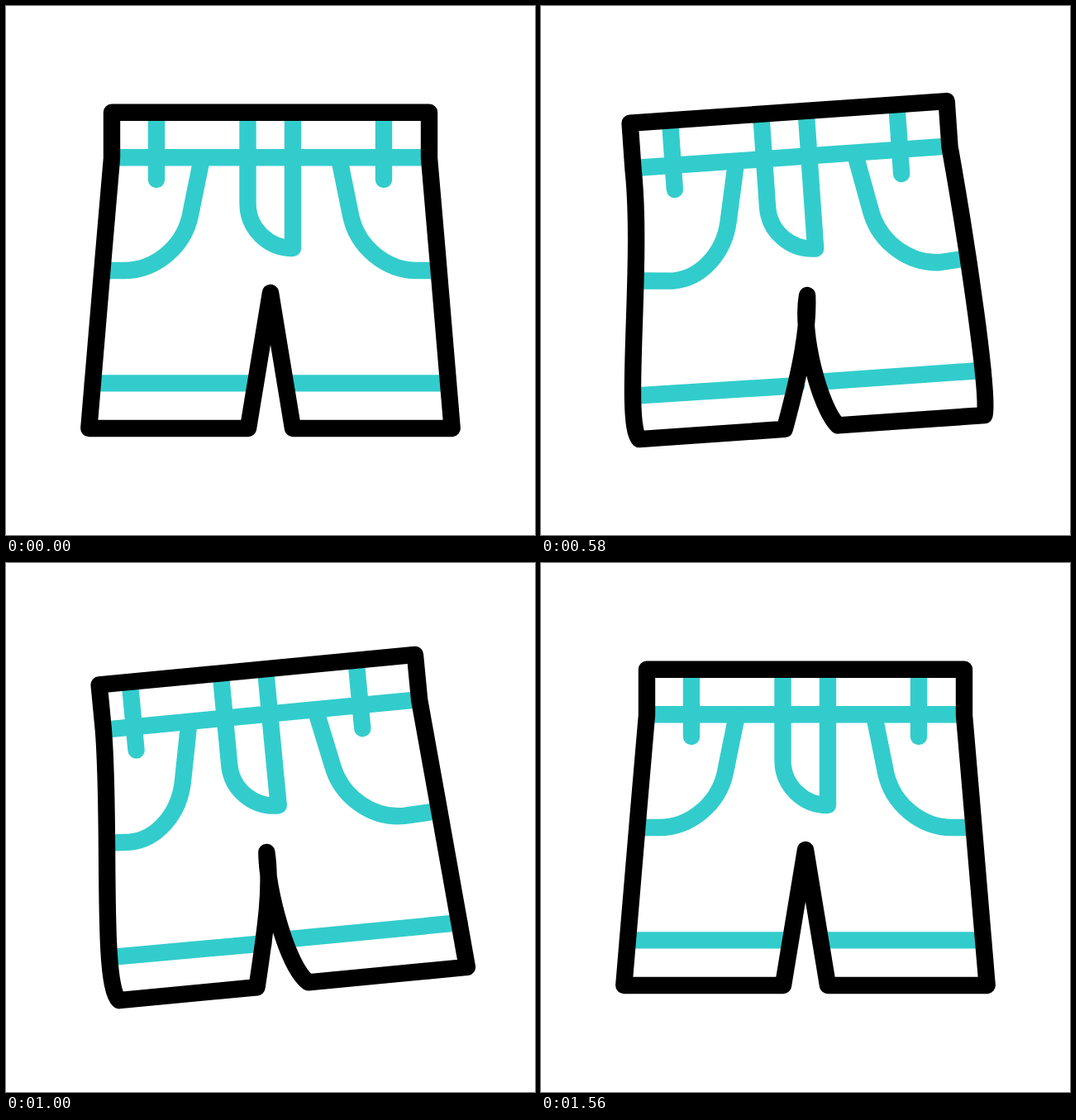
An HTML page that plays this animation: 640 px wide and 640 px high, repeating every 2400 ms.

```html
<!DOCTYPE html>
<html lang="en">
<head>
<meta charset="utf-8">
<title>Swinging shorts</title>
<style>
html, body { margin: 0; width: 100%; height: 100%; overflow: hidden; background: #fff; }
svg { display: block; width: 100vw; height: 100vh; }
path { fill: none; stroke-width: 20.4; stroke-linecap: round; stroke-linejoin: round; }
#trim path { stroke: #33cccc; }
#outline { stroke: #000; }
</style>
</head>
<body>
<svg viewBox="0 0 640 640">
  <g id="shorts">
    <g id="trim">
      <path id="band"/>
      <path id="details" d="M182 133V210M457 133V210M292.5 133V239A54.5 54 0 0 0 347 293V133"/>
      <path id="pockets"/>
      <path id="hem"/>
    </g>
    <path id="outline"/>
  </g>
</svg>
<script>
const LOOP = 2400, STEP = 20;
const el = id => document.getElementById(id);

// Damped swing: [time, degrees]
const swing = [[0, 0], [410, -20.2], [734, 10], [1007, -5.5], [1350, 3.8], [1560, 0]];

// Offsets of each part from its rest place, zero at both ends
const times = [0, 160, 420, 580, 734, 860, 1160, 1400];
const tracks = {
  body:   [-0.3, -1, -7.5, -4, -1, 4],
  lift:   [-1.4, -9.7, -1.3, -3, -0.7, 0],
  drop:   [0.7, 2.2, 2.7, 2, 2, 0.8],
  slide:  [-15.6, -42.6, -13, 8, -7, -19],
  pocket: [-16, -44.5, 8, 30, 17.5, -19],
  curve:  [-8, -18, 16, 32, 26, -12],
  hem:    [2.2, 7, 3, 2.5, 2.3, 3],
  footL:  [7.7, 26.5, 5, -11, 12, 20],
  sideL1: [-1, 1, 7, 6, 13, 5],
  sideL2: [-2, -8, -15, -14, -5, -4],
  footR:  [0, 3, -16, -13, -8, 8],
  sideR1: [0, -4, -5, -4, -2, 4],
  sideR2: [-2, -6, -6, 2, 1, 3],
  crotch: [-19.5, -54, 0, 26, 11.6, -21],
  cuffL:  [-10, -28, -11.5, 4, -4.5, -9.5],
  legL1:  [-1, -26, 6, 16, 9, -3],
  legL2:  [-16, -24, 2, 24, 14, -13],
  cuffR:  [-6, -11, -1, 12, 4.5, -1.5],
  legR1:  [-19, -47, -20, -5, -18, -20],
  legR2:  [-22, -51, -17, 2, -8, -27]
};

function swingAt(t) {
  const i = swing.findIndex(k => k[0] > t);
  if (i < 0) return 0;
  const [t0, a] = swing[i - 1], [t1, b] = swing[i];
  const u = (t - t0) / (t1 - t0);
  return a + (b - a) * u * u * (3 - 2 * u);
}

// Monotone cubic through the values, flat at every extreme
function trackAt(values, t) {
  const v = [0, ...values, 0];
  const i = times.findIndex(k => k > t) - 1;
  if (i < 0) return 0;
  const rate = k => (v[k + 1] - v[k]) / (times[k + 1] - times[k]);
  const slope = k => {
    if (k === 0 || k === v.length - 1) return 0;
    const a = rate(k - 1), b = rate(k);
    return a * b <= 0 ? 0 : 2 * a * b / (a + b);
  };
  const h = times[i + 1] - times[i], u = (t - times[i]) / h, w = 1 - u;
  return v[i] * w * w * (1 + 2 * u) + v[i + 1] * u * u * (3 - 2 * u)
    + h * u * w * (slope(i) * w - slope(i + 1) * u);
}

const str = p => p.map(n => n.toFixed(2)).join(' ');
const line = (...pts) => 'M' + pts.map(str).join('L');
const cubic = (...pts) => 'C' + pts.map(str).join(' ');

// Where the hem meets a curve: x at parameter t, at hem height plus dy
function hemPoint([a, b, c, d], t, dy) {
  const s = 1 - t;
  const x = a[0] * s * s * s + 3 * b[0] * s * s * t + 3 * c[0] * s * t * t + d[0] * t * t * t;
  return [x, 456.4 + dy];
}

function draw(t) {
  const o = {};
  for (const name in tracks) o[name] = trackAt(tracks[name], t);

  const sideL = [[128 + o.body, 184], [118 + o.sideL1, 300], [101.8 + o.sideL2, 490], [100.3 + o.footL, 511]];
  const sideR = [[512 + o.body, 184], [522 + o.sideR1, 300], [538 + o.sideR2, 490], [539.7 + o.footR, 511]];
  const tip = [320 + o.crotch, 347 + o.drop * 1.6];
  const legL = [tip, [313 + o.legL1, 390], [305.2 + o.legL2, 437], [293 + o.cuffL, 511]];
  const legR = [tip, [328.2 + o.legR1, 397], [343.5 + o.legR2, 490], [347 + o.cuffR, 511]];

  el('outline').setAttribute('d',
    line([128 + o.body, 128.7], [512 + o.body, 128.7], sideR[0]) + cubic(...sideR.slice(1)) +
    'L' + str(legR[3]) + cubic(legR[2], legR[1], tip) + cubic(...legL.slice(1)) +
    'L' + str(sideL[3]) + cubic(sideL[2], sideL[1], sideL[0]) + 'Z');

  el('band').setAttribute('d', line([130 + o.body, 183.3], [510 + o.body, 183.3]));
  el('details').setAttribute('transform', `translate(${o.slide} ${o.drop})`);

  const p = o.pocket, c = o.curve, s = o.slide, d = o.drop;
  el('pockets').setAttribute('d',
    line([237 + p, 184 + d], [223 + p, 253 + d]) +
    cubic([215 + p, 292 + d], [180 + (p + c) / 2, 320 + d], [143 + c, 320 + d]) + 'L121 320' +
    line([403 + s, 184 + d], [417 + s, 253 + d]) +
    cubic([425 + s, 292 + d], [460 + s, 320 + d], [497 + s, 320 + d]) + 'L517 320');

  el('hem').setAttribute('d',
    line(hemPoint(sideL, 0.71, o.hem * 0.6), hemPoint(legL, 0.73, o.hem)) +
    line(hemPoint(legR, 0.59, o.hem * 0.15), hemPoint(sideR, 0.71, o.hem * 0.1)));

  el('shorts').setAttribute('transform',
    `rotate(${swingAt(t)} 320 320) translate(0 ${o.lift})`);
}

const start = performance.now();
function tick() {
  const t = (performance.now() - start) % LOOP;
  draw(Math.floor(t / STEP) * STEP);
  requestAnimationFrame(tick);
}
draw(0);
requestAnimationFrame(tick);
</script>
</body>
</html>
```
